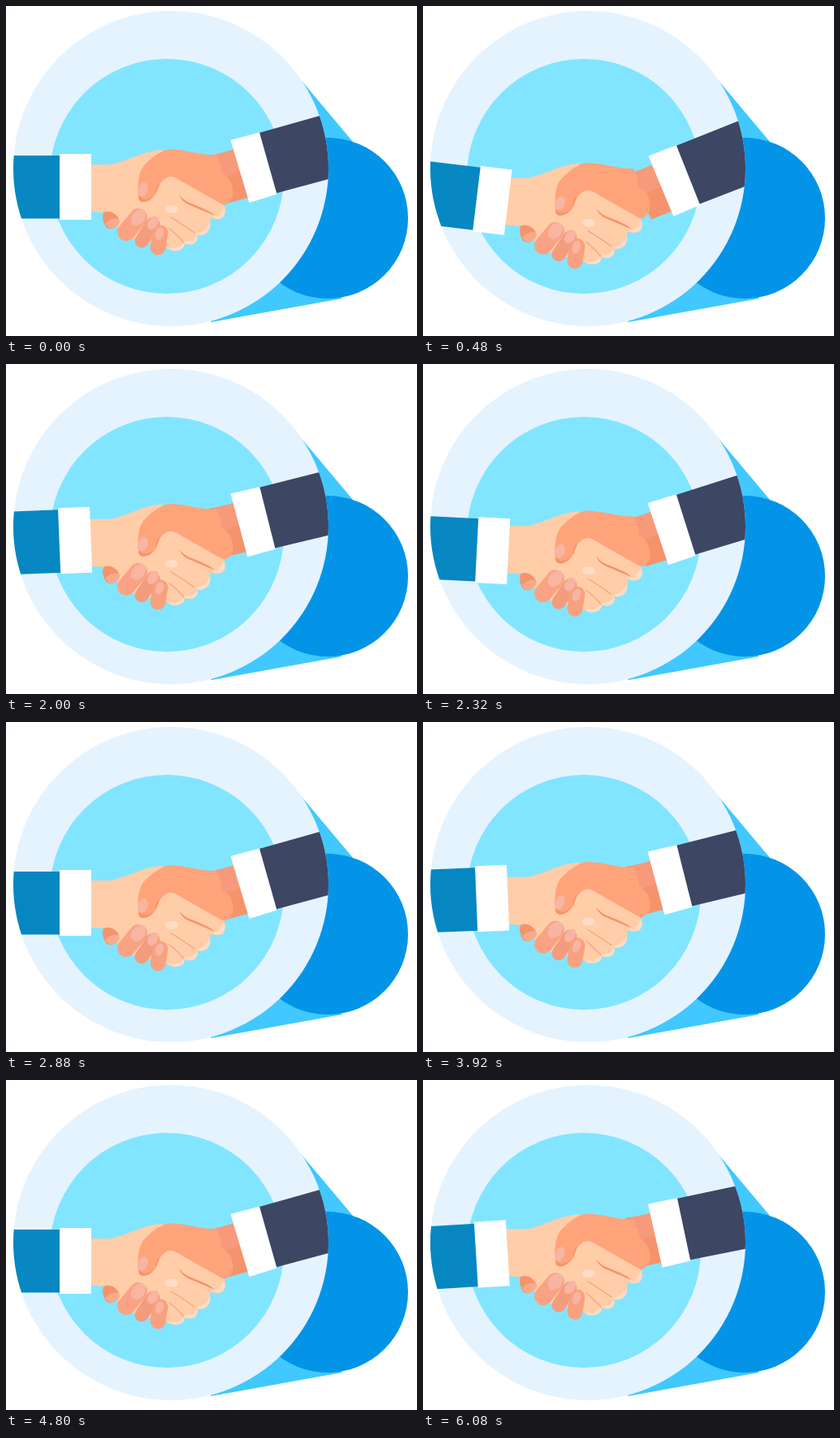
An HTML page that plays this animation: 506 by 406 pixels, repeating every 6.16 s.

```html
<!DOCTYPE html>
<html lang="en">
<head>
<meta charset="utf-8">
<title>Handshake</title>
<style>
  html, body { margin: 0; width: 100%; height: 100%; overflow: hidden; background: #fff; }
  svg { display: block; width: 506px; height: 406px; }
  .skin { fill: #ffcda8; }
  .tan { fill: #ffa37b; }
  .shade { fill: #f5936c; }
  .nail { fill: #f7b5a2; }
  .tip { fill: #ffdcc5; }
  .finger { fill: none; stroke-linecap: round; }
  .crease { fill: none; stroke: #f3a582; stroke-width: 1.4; stroke-linecap: round; }
</style>
</head>
<body>
<svg viewBox="0 0 506 406">
  <clipPath id="disc"><circle cx="203" cy="200" r="194"/></clipPath>

  <path fill="#40c8ff" d="M364 92 427 167 413 360 252 389Z"/>
  <circle cx="396" cy="261" r="99" fill="#0394e8"/>
  <circle cx="203" cy="200" r="194" fill="#e5f3ff"/>
  <ellipse cx="198" cy="209.5" rx="144" ry="144.5" fill="#82e5ff"/>

  <g clip-path="url(#disc)">
    <g class="right">
      <path class="shade" d="M250 184 Q264 182 290 173L308 233 272 243Z"/>
      <path fill="#f79a7b" d="M256 183 Q266 182 290 173L297 200 266 212Z"/>
    </g>

    <g id="hands">
      <!-- light hand -->
      <path class="skin" d="M92 195H128C148 192 168 178 192 177L210 195 262 239Q272 246 270 255
        Q267 264 256 262L251 261Q253 270 249 277Q244 283 236 282Q237 291 229 293Q223 294 220 292
        Q220 300 210 301Q203 302 197 297L150 285 120 254 92 252Z"/>

      <!-- dark hand: back and thumb -->
      <path class="tan" d="M163 236Q160 205 172 194Q187 179 201 176Q218 177 236 181Q252 184 259 183
        Q265 196 266 206Q279 214 279 226Q281 236 275 241Q271 246 266 244L215 215Q205 208 198 211
        Q187 217 186 229Q178 242 168 241Q163 240 163 236Z"/>
      <path class="shade" d="M163 233Q170 242 180 234Q187 228 190 216Q185 221 184 229Q177 242 168 241Q163 240 163 233Z"/>
      <ellipse class="nail" cx="168.5" cy="226" rx="6" ry="9" transform="rotate(22 168.5 226)"/>

      <!-- light fingers -->
      <path class="shade" d="M213 232Q216 240 224 244L257 258Q252 252 228 243Q218 239 213 232Z"/>
      <path class="crease" d="M203 260Q212 265 232 279M201 274Q209 280 219 291"/>
      <ellipse class="tip" cx="204" cy="250" rx="8" ry="5"/>
      <path class="tip" d="M268 247Q272 253 267 260Q260 264 254 259Q264 258 268 247Z"/>
      <path class="tip" d="M251 266Q252 276 246 280Q239 284 234 280Q246 277 251 266Z"/>
      <path class="tip" d="M236 282Q236 291 229 293Q223 294 219 290Q230 290 236 282Z"/>
      <path class="tip" d="M220 291Q220 300 210 301Q204 302 199 298Q213 299 220 291Z"/>

      <!-- dark fingertips -->
      <path class="shade" d="M120 254Q130 250 138 260Q142 267 136 271Q130 277 123 272Q117 262 120 254Z"/>
      <path fill="#f8ab8c" d="M122 268Q130 260 139 262Q141 268 135 272Q128 277 122 268Z"/>
      <path class="finger" stroke="#f9a384" stroke-width="22" d="M163 260 148 278"/>
      <path class="finger" stroke="#f39c7e" stroke-width="17" d="M181 268 167 289"/>
      <path class="finger" stroke="#f9a07e" stroke-width="19" d="M190 279 187 297"/>
      <ellipse class="nail" cx="163" cy="260" rx="8" ry="11" transform="rotate(38 163 260)"/>
      <ellipse class="nail" cx="181" cy="267" rx="6" ry="9" transform="rotate(35 181 267)"/>
      <ellipse class="nail" cx="189" cy="280" rx="5" ry="8" transform="rotate(18 189 280)"/>
    </g>

    <g class="left">
      <path fill="#0787c1" d="M-20 184H67V261.5H-20Z"/>
      <path fill="#fff" d="M66 182H105V263H66Z"/>
    </g>
    <g class="right">
      <path fill="#3d4663" d="M311 156.3 420 125.5 442 201 332 230.5Z"/>
      <path fill="#fff" d="M276.5 165 312 155.5 333.5 231.5 299.5 242Z"/>
    </g>
  </g>
</svg>
<script>
const LOOP = 6160, SHAKE = 1920, STEP = 80;
// [step, vertical offset]: up, down, up, rest
const keys = [[0, 0], [3.1, -18], [6.4, 18], [9.2, -18], [12, 0]];

function offset(step) {
  const i = keys.findIndex(k => step < k[0]);
  if (i < 1) return 0;
  const [a, from] = keys[i - 1], [b, to] = keys[i];
  const ease = (1 - Math.cos(Math.PI * (step - a) / (b - a))) / 2;
  return from + (to - from) * ease;
}

const move = (selector, transform) => document.querySelectorAll(selector)
  .forEach(part => part.setAttribute('transform', transform));

function draw(time) {
  const step = Math.floor(time % LOOP % SHAKE / STEP);
  // the arms run slightly ahead of the hands
  const ahead = lead => step ? offset(step + lead) : 0;
  move('#hands', `translate(0 ${offset(step)})`);
  move('.left', `rotate(${ahead(.2) * .39} -54 230)`);
  move('.right', `rotate(${ahead(.06) * -.35} 464 165)`);
}

const start = performance.now();
function tick() {
  draw(performance.now() - start);
  requestAnimationFrame(tick);
}
tick();
</script>
</body>
</html>
```
